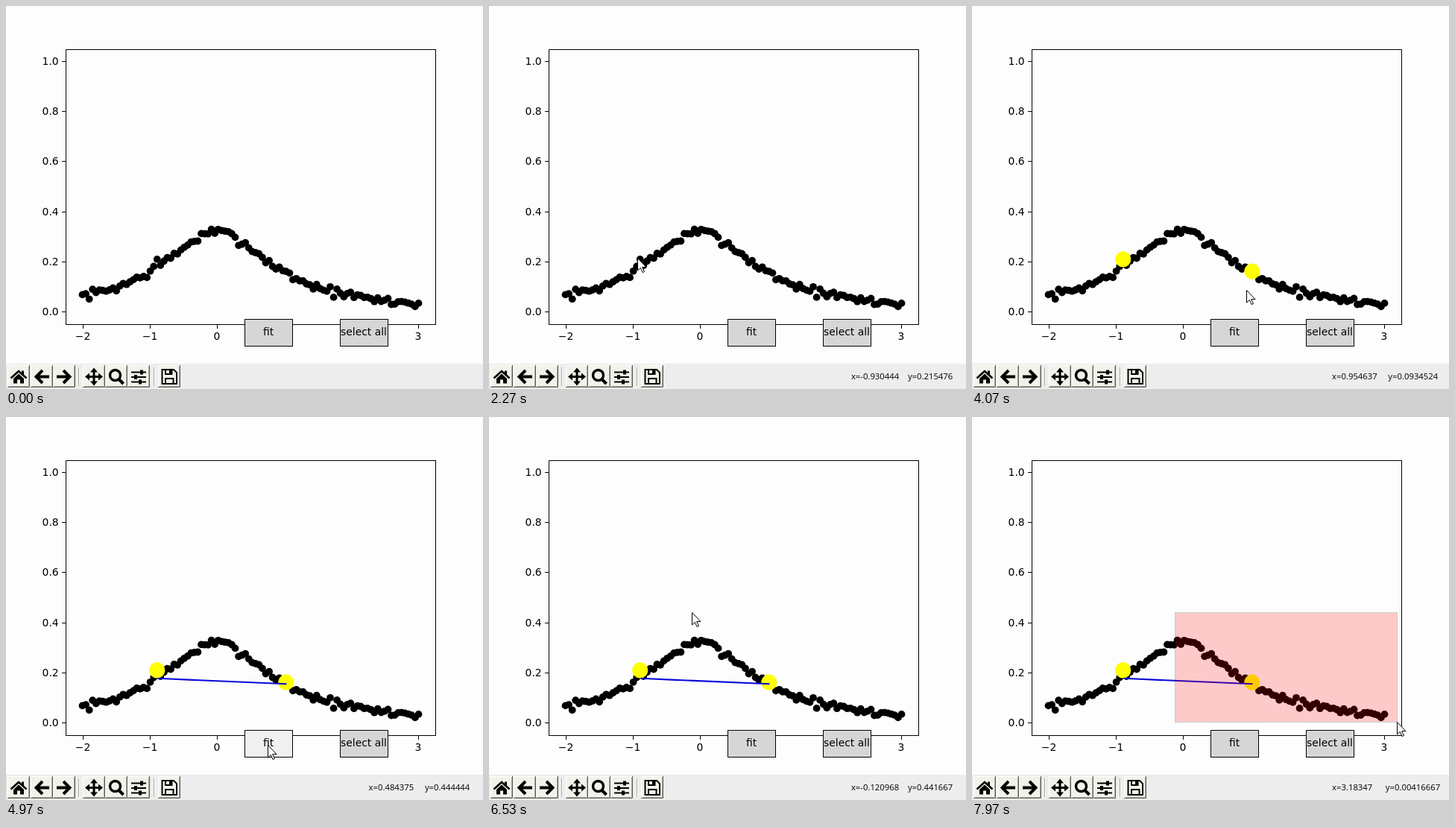
An HTML page for the animation above (8000 ms loop, 640 by 514 pixels).

```html
<!DOCTYPE html>
<html lang="en">
<head>
<meta charset="utf-8">
<title>Point picker</title>
<style>
html, body { margin: 0; width: 100%; height: 100%; overflow: hidden; background: #fdfdfd; }
svg { display: block; width: 640px; height: 514px; }
.plot text { font: 13.89px "DejaVu Sans", sans-serif; }
#coords { font: 11.3px "Open Sans", "Noto Sans", sans-serif; white-space: pre; text-anchor: end; }
.mid { text-anchor: middle; }
.end { text-anchor: end; }
.line { fill: none; stroke: #000; }
</style>
</head>
<body>
<svg viewBox="0 0 640 514">
  <rect width="640" height="514" fill="#fdfdfd"/>
  <g class="plot">
    <g id="dots"></g>
    <g id="picks" fill="#ff0"></g>
    <path id="fitLine" d="M203.5 350.8L376.5 358.3" fill="none" stroke="#0808dc" stroke-width="2.1"/>
    <rect id="box" x="272.5" y="262.5" fill="#f00" stroke="#000" opacity=".2"/>
    <g id="axes"></g>
    <rect class="line" x="80.5" y="58.5" width="496" height="369"/>
    <g stroke="#000" fill="#d6d6d6">
      <rect id="fitBtn" x="320.5" y="420.5" width="64" height="36"/>
      <rect x="448.5" y="420.5" width="64" height="36"/>
    </g>
    <text class="mid" x="352" y="442">fit</text>
    <text class="mid" x="480" y="442">select all</text>
  </g>
  <rect y="480" width="640" height="34" fill="#ededed"/>
  <g id="bar"></g>
  <text id="coords" x="634" y="501"></text>
  <path id="cursor" d="M.5 .5V17l3.8-3.6 2.8 6.2 2.4-1.1-2.8-5.9h5.3z" fill="#fdfdfd" stroke="#000"/>
</svg>
<script>
const LOOP = 8000, LAG = 30, COUNT = 100;
const $ = id => document.getElementById(id);

// Data space to stage pixels
const toX = v => 80 + (v + 2.25) / 5.5 * 496;
const toY = v => 410.4 - v * 336;

// Seeded noise, roughly normal
let seed = 7;
function random() {
  seed = (seed * 1664525 + 1013904223) % 4294967296;
  return seed / 4294967296;
}
const noise = () => (random() + random() + random() - 1.5) * 0.018;

// Samples of a Lorentz curve; the picked ones sit a little above it
const picks = [
  { index: 22, above: 0.032, at: 2500 },
  { index: 60, above: 0.007, at: 3560 }
];
const samples = Array.from({ length: COUNT }, (_, i) => {
  const v = -2 + 5 * i / (COUNT - 1);
  const pick = picks.find(p => p.index === i);
  return [toX(v), toY(1 / (Math.PI * (1 + v * v)) + (pick ? pick.above : noise()))];
});
const dot = ([x, y], r) => `<circle cx="${x.toFixed(1)}" cy="${y.toFixed(1)}" r="${r}"/>`;
$('dots').innerHTML = samples.map(p => dot(p, 4.9)).join('');
$('picks').innerHTML = picks.map(p => dot(samples[p.index], 10.6)).join('');

// Ticks and labels
let axes = '';
for (const v of [-2, -1, 0, 3]) {
  const x = Math.round(toX(v));
  axes += `<path class="line" d="M${x + 0.5} 428v5"/>` +
    `<text class="mid" x="${x}" y="448">${v < 0 ? '\u2212' + -v : v}</text>`;
}
for (let i = 0; i <= 5; i++) {
  const y = Math.floor(toY(i / 5));
  axes += `<path class="line" d="M75 ${y + 0.5}h5"/>` +
    `<text class="end" x="70.7" y="${y + 5}">${(i / 5).toFixed(1)}</text>`;
}
$('axes').innerHTML = axes;

// Toolbar icons, drawn around their centre
const stroke = (d, w) => `<path class="line" d="${d}" stroke-width="${w}"/>`;
const fill = d => `<path d="${d}"/>`;
const arrow = s => stroke(`M${10 * s} 0H${-7 * s}M${s} -8.5L${-7.5 * s} 0L${s} 8.5`, 4);
const spin = d => [0, 90, 180, 270].map(a => `<path d="${d}" transform="rotate(${a})"/>`).join('');
const icons = [
  [2, stroke('M-10.5 2L0 -7.5L10.5 2', 2.6) + fill('M-7 2.5L0 -4L7 2.5V9H2V4H-2V9H-7zM4 -8H7V-2L4 -5z')],
  [33, arrow(1)],
  [63, arrow(-1)],
  [103, stroke('M-8 0H8M0 -8V8', 3) + spin('M0 -12L5 -6H-5z')],
  [133, '<circle class="line" cx="-1.5" cy="-2" r="7" stroke-width="3.4"/>' + stroke('M3.5 3.5L9.5 9.5', 4)],
  [163, stroke('M-10 -6H10M-10 .5H10M-10 7H10', 2.2) + fill('M2 -9H6V-3H2zM-6 -2.5H-2V3.5H-6zM0 4H4V10H0z')],
  [204, stroke('M-9.5 -9.5H6L10 -5.5V9.5H-9.5zM-5 9V2.5H5.5V9M-5 -9V-3.5H3.5V-9', 2) + fill('M0 -9H3V-4H0z')]
];
const edge = (d, color) => `<path fill="none" stroke="${color}" d="${d}"/>`;
const bevel = x =>
  `<rect x="${x}" y="482" width="30" height="30" fill="#f2f2ea"/>` +
  edge(`M${x + 0.5} 511V482.5H${x + 29}`, '#fff') +
  edge(`M${x + 1.5} 510.5H${x + 28.5}V483.5`, '#a4a49c') +
  edge(`M${x} 511.5H${x + 29.5}V482`, '#60605a');
const rule = x => edge(`M${x + 0.5} 485v25`, '#a8a8a0') + edge(`M${x + 1.5} 485v25`, '#fff');
$('bar').innerHTML = icons.map(([x, art]) =>
  bevel(x) + `<g transform="translate(${x + 15} 497.5)">${art}</g>`).join('') + rule(97) + rule(198);

// Pointer moves; it rests between them
const smooth = u => u * u * (3 - 2 * u);
const drag = { at: 6587, dur: 1277, x: 570, y: 409, easeX: u => u, easeY: u => u ** 0.65 };
const moves = [
  { at: 900, dur: 680, x: 199, y: 338 },
  { at: 2700, dur: 700, x: 376, y: 356 },
  { at: 3790, dur: 300, x: 368, y: 381 },
  { at: 4120, dur: 280, x: 351, y: 440 },
  { at: 5285, dur: 700, x: 317.3, y: 340 },
  { at: 6050, dur: 400, x: 272, y: 262 },
  drag
];

function pointer(t) {
  let x = 243, y = 264;
  for (const m of moves) {
    const u = Math.max(0, Math.min(1, (t - m.at) / m.dur));
    x += (m.x - x) * (m.easeX || smooth)(u);
    y += (m.y - y) * (m.easeY || smooth)(u);
  }
  return [Math.round(x), Math.round(y)];
}

const onFit = (x, y) => x >= 320 && x <= 384 && y >= 420 && y <= 456;
const short = v => String(Number(v.toPrecision(6))).padEnd(12);

function readout(x, y) {
  const v = onFit(x, y)
    ? [(x - 320) / 64, (456 - y) / 36]
    : [(x - 80) / 496 * 5.5 - 2.25, (410.4 - y) / 336];
  return `x=${short(v[0])} y=${short(v[1])}`.replace(/ /g, '\u00a0');
}

const show = (node, on) => node.setAttribute('visibility', on ? 'visible' : 'hidden');

function draw(t) {
  const [x, y] = pointer(t), [px, py] = pointer(t - LAG);
  $('cursor').setAttribute('transform', `translate(${x} ${y})`);
  show($('cursor'), t >= 1940);
  $('coords').textContent = t >= 1100 ? readout(px, py) : '';
  picks.forEach((p, i) => show($('picks').children[i], t >= p.at));
  show($('fitLine'), t >= 4800);
  $('fitBtn').setAttribute('fill', onFit(px, py) ? '#f0f0f0' : '#d6d6d6');
  show($('box'), t > drag.at + LAG);
  $('box').setAttribute('width', Math.max(0, px - 272));
  $('box').setAttribute('height', Math.max(0, py - 262));
}

const start = performance.now();
function tick() {
  draw((performance.now() - start) % LOOP);
  requestAnimationFrame(tick);
}
tick();
</script>
</body>
</html>
```
